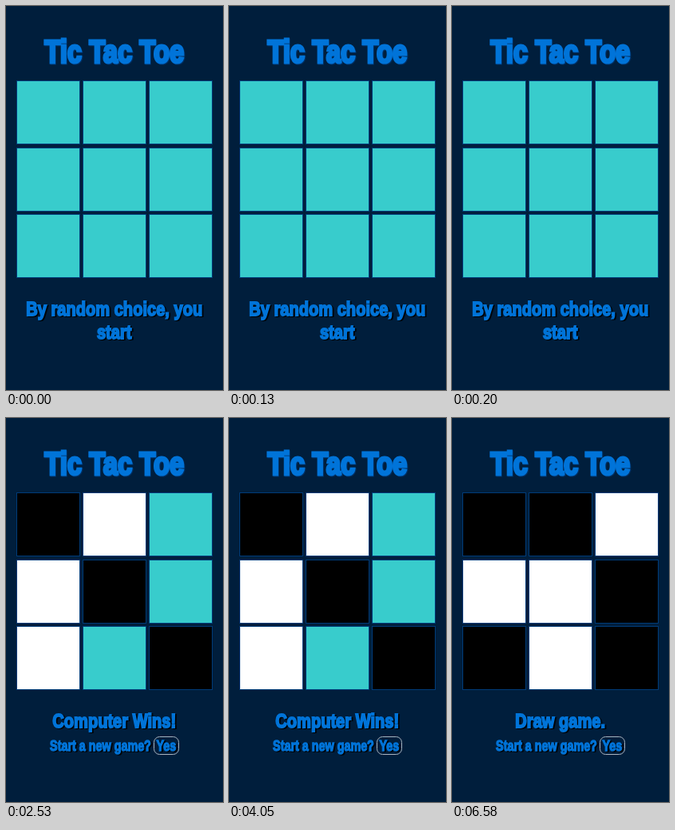
An HTML page for the animation above (7590 ms loop, 272x480 px).

```html
<!DOCTYPE html>
<html lang="en">
<head>
<meta charset="utf-8">
<title>Tic Tac Toe</title>
<style>
  html, body { margin: 0; width: 100%; height: 100%; overflow: hidden; background: #001e3c; }
  svg { display: block; width: 100%; height: 100%; }
  /* Heavy condensed lettering: one narrow setting shared by all text. */
  text {
    font-family: "Liberation Sans", Arial, sans-serif;
    font-weight: bold;
    text-anchor: middle;
    fill: #0074d9;
    stroke: #0074d9;
    stroke-width: .08em;
    filter: drop-shadow(2.2px 1.8px 0 #000);
  }
  #title { filter: drop-shadow(1px 1px 0 #00336b); }
  #board rect { stroke: #003b78; }
  #button { fill: none; stroke: #a9b4c0; }
</style>
</head>
<body>
<svg viewBox="0 0 272 480">
  <g id="board"></g>
  <g id="labels"></g>
  <rect id="button" x="185.5" y="398.5" width="31" height="22" rx="7"/>
</svg>
<script>
const SVG = "http://www.w3.org/2000/svg";
const LOOP = 7590;
const CONDENSED = 0.82;
const COLORS = { ".": "#38cccc", X: "#000", O: "#fff" };
const scenes = [
  { start: 0, cells: ".........", status: "By random choice, you", next: "start" },
  { start: 2530, cells: "XO.OX.O.X", status: "Computer Wins!", over: true },
  { start: 5070, cells: "XXOOOXXOX", status: "Draw game.", over: true }
];

const board = document.getElementById("board");
const labels = document.getElementById("labels");
const button = document.getElementById("button");

function add(parent, tag, attributes) {
  const node = document.createElementNS(SVG, tag);
  for (const name in attributes) node.setAttribute(name, attributes[name]);
  return parent.appendChild(node);
}

function label(x, y, size, content = "") {
  const node = add(labels, "text", {
    transform: `translate(${x} ${y}) scale(${CONDENSED} 1)`,
    "font-size": size
  });
  node.textContent = content;
  return node;
}

const cells = Array.from({ length: 9 }, (_, i) => add(board, "rect", {
  x: [13.5, 96.5, 179.5][i % 3],
  y: [93.5, 177.5, 260.5][Math.floor(i / 3)],
  width: 79,
  height: 79
}));

label(135.7, 70.7, 40, "Tic Tac Toe").id = "title";
const status = label(135.7, 386.5, 24.5);
const secondLine = label(135.7, 415.5, 24.5);
const question = label(118.5, 415.5, 17.5, "Start a new game?");
const answer = label(200.8, 415.5, 17.5, "Yes");

function show(scene) {
  cells.forEach((cell, i) => cell.setAttribute("fill", COLORS[scene.cells[i]]));
  status.textContent = scene.status;
  secondLine.textContent = scene.next || "";
  for (const node of [question, answer, button]) {
    node.style.display = scene.over ? "" : "none";
  }
}

const origin = performance.now();
let current;
function tick() {
  const time = (performance.now() - origin) % LOOP;
  const scene = scenes.findLast(s => time >= s.start);
  if (scene !== current) show(current = scene);
  requestAnimationFrame(tick);
}
tick();
</script>
</body>
</html>
```
